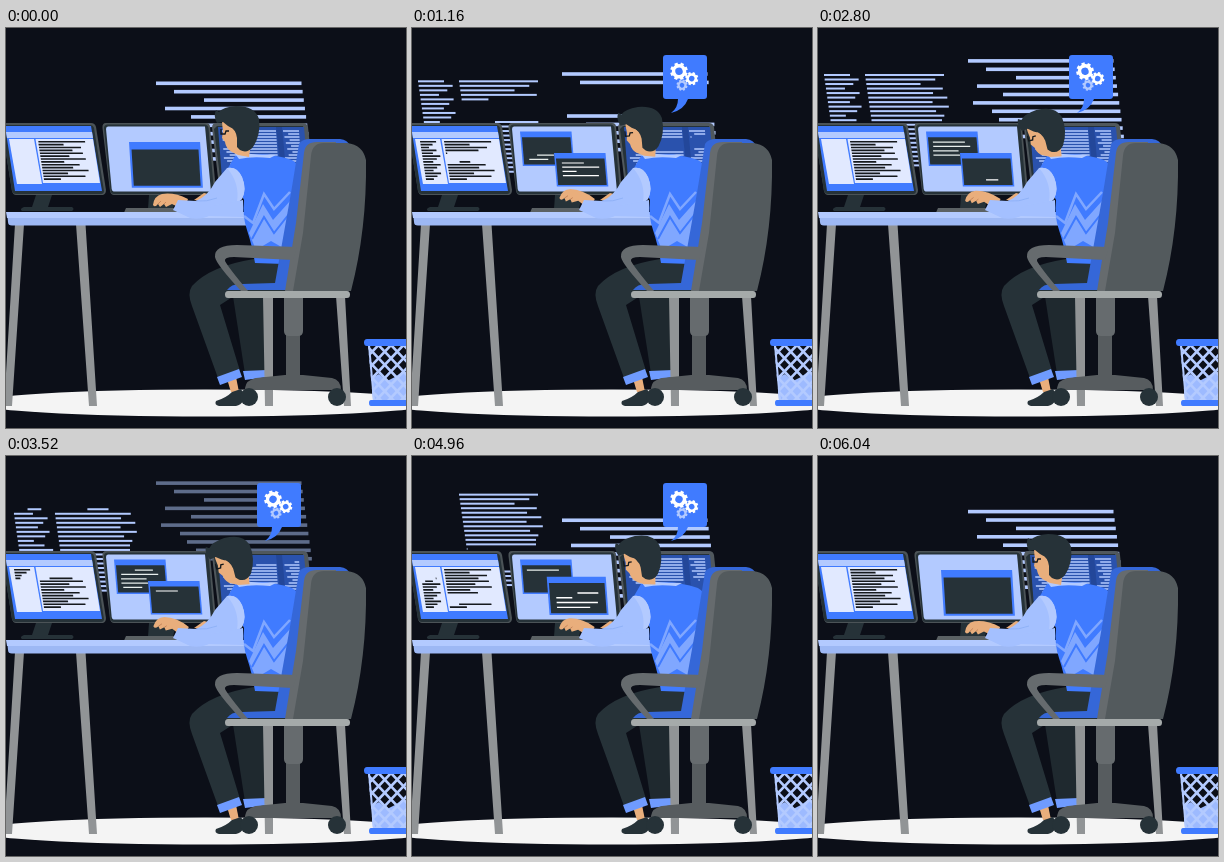
An HTML page with a canvas that plays this animation: 400 px wide and 400 px high, repeating every 6.08 s.

```html
<!DOCTYPE html>
<html lang="en">
<head>
<meta charset="utf-8">
<title>Programmer at work</title>
<style>
html, body { margin: 0; width: 100%; height: 100%; overflow: hidden; background: #0c0f18; }
canvas { display: block; width: 400px; height: 400px; }
</style>
</head>
<body>
<canvas id="stage" width="400" height="400"></canvas>
<script>
const ctx = document.getElementById('stage').getContext('2d');
const LOOP = 6080, WAVE = LOOP / 2;
const BLUE = '#407bff', PALE = '#b3caff', SLEEVE = '#a4c0ff', DARK = '#263238', SKIN = '#e9ae7c';
const STEEL = '#919496', GREY = '#666b6e', CHAIR = '#535a5d';

const clamp = v => Math.max(0, Math.min(1, v));
const paths = {};
function shape(color, d) {
  ctx.fillStyle = color;
  ctx.fill(paths[d] ||= new Path2D(d));
}
function stroke(color, width, d) {
  ctx.strokeStyle = color;
  ctx.lineWidth = width;
  ctx.stroke(paths[d] ||= new Path2D(d));
}
function disc(color, x, y, rx, ry = rx) {
  ctx.fillStyle = color;
  ctx.beginPath();
  ctx.ellipse(x, y, rx, ry, 0, 0, 7);
  ctx.fill();
}
function layer(alpha, draw) {
  if (alpha <= 0) return;
  ctx.save();
  ctx.globalAlpha *= alpha;
  draw();
  ctx.restore();
}
// Smoothed interpolation through [time, value] pairs.
function key(t, ...keys) {
  let [t0, v0] = keys[0];
  for (const [t1, v1] of keys) {
    if (t < t1) {
      const k = clamp((t - t0) / (t1 - t0));
      return v0 + (v1 - v0) * k * k * (3 - 2 * k);
    }
    [t0, v0] = [t1, v1];
  }
  return v0;
}
// A line of code, typed at `on` and wiped from its left end at `off`.
function row(color, x0, x1, y, h, p, off, on, d = 140) {
  let a = clamp((p - off) / d), b = clamp((p - on) / d);
  if (off < on) p < on ? b = 1 : a = 0;
  if (b <= a) return;
  ctx.fillStyle = color;
  ctx.fillRect(x0 + (x1 - x0) * a, y - h / 2, (x1 - x0) * (b - a), h);
}

const rightStarts = [150, 168, 198, 159, 185, 155, 174, 181, 190, 184];
const rightOn = { 2: 1250, 3: 1400, 4: 1550, 5: 1080, 6: 2300 };
const midEnds = [126, 117, 102, 124, 114, 128, 113, 129, 116, 124];
const sideEnds = [32, 40, 34, 25, 39, 34, 28, 39, 34, 22];

function backgroundCode(t, p) {
  const shift = t < 3640 ? t : t - LOOP;
  layer(t < 3640 ? 1 - clamp((t - 3400) / 240) : clamp((t - 3640) / 1000), () => {
    rightStarts.forEach((x, i) => {
      const on = rightOn[i] ?? -LOOP;
      const off = on < 0 ? LOOP * 2 : i == 6 ? 1830 : 420 + 40 * i;
      row(PALE, x, 295.5 + 1.15 * i, 55.3 - .008 * shift + 8.4 * i, 3.6, t, off, on, 200);
    });
  });
  layer(Math.min(clamp((t - 250) / 450), clamp((5900 - t) / 600)), () => {
    for (let i = 0; i < 21; i++) {
      const y = 57.8 - .00386 * t + 4.52 * i, lean = .65 * i;
      row(PALE, 47 + lean, i < 10 ? midEnds[i] + .4 * lean : 124, y, 2, p, 220 + 100 * i, 720 + 100 * i, 100);
      if (i < 13) row(PALE, 6 + lean, sideEnds[i % 10] + lean, y, 2, t, 3260 + 100 * i, 250 + 55 * i, 120);
    }
  });
}

function gear(color, x, y, r, teeth, angle) {
  ctx.save();
  ctx.translate(x, y);
  ctx.rotate(angle);
  ctx.strokeStyle = color;
  ctx.lineWidth = r * .4;
  ctx.beginPath();
  ctx.arc(0, 0, r * .62, 0, 7);
  ctx.stroke();
  ctx.fillStyle = color;
  for (let i = 0; i < teeth; i++) {
    ctx.rotate(2 * Math.PI / teeth);
    ctx.fillRect(-r * .19, -r, r * .38, r * .35);
  }
  ctx.restore();
}
function bubble(t) {
  const s = key(t, [440, 0], [760, 1], [5720, 1], [5960, 0]);
  if (!s) return;
  const turn = t / LOOP * 2 * Math.PI;
  ctx.save();
  ctx.translate(273, 53);
  ctx.scale(s, s);
  ctx.translate(-273, -53);
  shape(BLUE, 'M254 27H292Q295 27 295 30V68Q295 71 292 71H276Q272 82 259 85Q266 80 266 71H254Q251 71 251 68V30Q251 27 254 27Z');
  gear('#fff', 267, 43.3, 8.8, 8, turn);
  gear('#fff', 279.7, 50.6, 6.6, 8, -turn);
  gear(PALE, 270, 57.2, 5.6, 8, -turn);
  ctx.restore();
}

function leftMonitor(p) {
  shape('#4b5357', 'M-4 95H85Q89 95 90 99L100 162Q100 166 97 167H10Q7 167 6 163L-4 100Z');
  shape(DARK, 'M-4 97H84Q87 97 88 100L98 163Q98 166 95 166H10Q7 166 6 163L-4 100Z');
  shape(BLUE, 'M-1 98H85L96 163H9Z');
  shape(PALE, 'M0 104H86L87 110H1Z');
  shape('#e1e9ff', 'M3 111H28L36 156H11Z');
  shape('#e1e9ff', 'M29.500 111H87L94 155H37Z');
  ctx.save();
  ctx.transform(1, 0, .155, 1, -.155 * 113, 0);
  const ends = [79, 57, 74, 65, 75, 61, 77, 55, 70, 63, 78, 57, 74, 49];
  ends.forEach((x, i) => {
    const y = 113.7 + 2.88 * i, off = Math.max(0, 1060 + (y - 133.5) * 56);
    row('#15191d', 32, x, y, 1.6, p, off, off + 560, 150);
  });
  for (let i = 0; i < 14; i++) {
    row('#15191d', 8, 16 + (i * 7 + 8) % 11, 113.7 + 2.88 * i, 1.6, p, 1600 + 72 * i, 280 + 55 * i, 110);
  }
  ctx.restore();
  shape(DARK, 'M30 167H46L42 179H66Q69 181 66 183H16Q13 181 18 179H26Z');
}

// Content uses a 54 by 33 grid.
function editor(x, y, w, h, content) {
  ctx.save();
  ctx.translate(x, y);
  ctx.transform(w / 54, 0, .085, h / 33, 0, 0);
  shape(BLUE, 'M0 0H51.500V33.500H0Z');
  shape(DARK, 'M1.500 5.500H50V32H1.500Z');
  content();
  ctx.restore();
}
function middleMonitor(t, p) {
  shape('#4b5357', 'M100 95H200Q204 95 204 99L210 163Q210 167 207 167H108Q105 167 104 163L96.500 100Q96 95 100 95Z');
  shape(DARK, 'M101 96.500H199Q202 97 202.500 100L208 163Q208 166 205 166H108Q105 166 104.500 163L98 100Q98 97 101 96.500Z');
  shape(PALE, 'M102 98.500H199L205 163.500H107.500Q106 163 105.700 161L100 101Q100 98.500 102 98.500Z');
  const back = key(t, [480, 0], [850, 1], [5640, 1], [5940, 0]);
  layer(back, () => editor(108, 103.5, 54, 34, () => {
    [[6, 38], [6, 43], [5.5, 31], [5.5, 32], [7, 26]].forEach(([a, b], i) =>
      row('#e8efed', a, b, 10.3 + 4.2 * i, 1.2, p, 420 + 230 * i, 1720 + 280 * i));
  }));
  const big = key(t, [0, 1], [350, 1], [850, 0], [4750, 0], [5250, 1]);
  editor(142 - 19 * big, 125 - 11 * big, 54 + 20.5 * big, 33 + 12 * big, () => {
    [[7, 29], [7, 44], [7, 21], [7, 43], [7, 36]].forEach(([a, b], i) =>
      row('#fff', a, b, 10 + 4.2 * i, 1.2, p, 1560 + 290 * i, 280 + 240 * i));
  });
  shape(DARK, 'M143 167H170L167 181H142Z');
}

function rightMonitor(p) {
  shape('#50585d', 'M210 95H297Q301 95 302 99L309 166H214L206 100Q206 95 210 95Z');
  shape(DARK, 'M211 98H297L304 165H216L208 101Z');
  shape('#2a52ad', 'M212 99H298L304 164H217Z');
  shape('#23479a', 'M270 99H276L282 164H277Z');
  ctx.save();
  ctx.transform(1, 0, .07, 1, -.07 * 103, 0);
  for (let i = 0; i < 12; i++) {
    const y = 103 + 3 * i, off = 100 + 150 * i;
    row(PALE, 216 + i % 3 * 3, 270, y, 1.6, p, off, off + 600);
    row(PALE, 277 + i * 5 % 9, 293, y, 1.6, p, off + 150, off + 750);
  }
  ctx.restore();
}

function desk() {
  shape(STEEL, 'M9 196H18L6 378H-2ZM70 196H79.500L91 378H83Z');
  shape('#5b6164', 'M120 180H172V184.500H118Z');
  shape('#9db8f4', 'M1 184H248V197.500H6Q2 197.500 2 194Z');
  shape(PALE, 'M0 184H249V190H1Z');
}

function head(t) {
  const tilt = key(t, [0, 0], [400, 0], [1160, -5], [1920, -10], [2800, -14.5], [4360, -15], [5560, -2.5], [6040, 0]);
  ctx.save();
  ctx.translate(240, 126);
  ctx.rotate(tilt * Math.PI / 180);
  ctx.translate(-240, -126);
  shape(SKIN, 'M216 90Q216 98 217 103L216 110L219 114Q220 121 226 124L232 127L243 129L246 108L230 92Z');
  shape(DARK, 'M211 95Q207 88 210 82L213 84Q217 79 230 78Q249 78 253 91Q255 107 247 119Q241 126 234 122L231 119V110Q230 101 222 98L217 94Z');
  disc(SKIN, 225, 106, 3.4, 6);
  stroke('#15191d', 1.3, 'M215 101V106H219L220 103H223');
  ctx.restore();
}

function person(t) {
  shape(SKIN, 'M221 351L230 349L233 364H225Z');
  shape(DARK, 'M210 373Q220 370 226 364L235 361Q239 367 237 373Q235 377 230 378H213Q208 377 210 373Z');
  shape('#1f292f', 'M226 262H258L261 344L239 346Z');
  shape(DARK, 'M248 231Q204 238 186 258Q181 265 186 278L212 350L234 343L214 277L228 268L258 264H280V231Z');
  shape('#6f9bff', 'M211 349L233 341L236 349L214 357ZM237 343L261 342L262 349L239 352Z');
  shape(SKIN, 'M188 172L198 165L206 167L200 174Z');
  shape(BLUE, 'M229 128Q255 124 270 128Q287 130 293 138L278 236L249 235Q246 217 241 202Q236 187 238 172L222 140Z');
  stroke('#80a7ff', 2.5, 'M238 188L247 195L258 166L268 181L284 164');
  shape('#80a7ff', 'M243 205L257 176L267 192L284 173L279 221L265 213L250 222Z');
  stroke(BLUE, 2, 'M246 211L258 189L268 205L283 186');
  shape(PALE, 'M227 123Q242 127 270 127L264 130Q246 128 233 131Z');

  const lift = (1 - Math.cos(t / LOOP * 36 * Math.PI)) / 2;
  ctx.save();
  ctx.translate(178, 176 - lift);
  ctx.rotate(lift * .2);
  ctx.translate(-178, -177);
  shape(SKIN, 'M182 172Q168 165 156 167Q148 169 147 178Q149 181 152 177L154 180L158 177L160 180L166 177L178 183Z');
  stroke('#b97850', .7, 'M152 177L155 174M158 177L160 175');
  ctx.restore();
  shape(SLEEVE, 'M221 140Q231 138 236 149Q241 161 236 171Q228 180 212 183Q198 193 184 190L167 182L172 172L190 173Q202 168 209 154Z');
  shape(PALE, 'M221 140Q231 138 236 149Q241 161 236 171L231 174Q234 155 221 140Z');
  shape(SLEEVE, 'M205 178L237 172V189L203 188Z');
  stroke('#8baef5', .8, 'M190 173Q201 174 211 170');
  head(t);
}

function chair() {
  shape('#3567d8', 'M293 116Q296 111 304 111H334Q342 112 344 118L302 125L284 262H221Q226 255 236 256L269 255L285 165Z');
  shape(GREY, 'M298 125Q299 114 311 114H330L300 263H279L290 195Z');
  shape(CHAIR, 'M305 128Q306 115 318 115H341Q357 117 360 132Q361 201 345 263H287L297 205Z');
  shape(GREY, 'M291 219L231 217Q208 217 209 229Q210 236 235 263H242Q222 239 219 233Q218 229 228 229L287 232Z');
  shape(STEEL, 'M257 268H267V378H259ZM330 268H339L345 378H338Z');
  shape('#a5aaaa', 'M222 263H341Q344 263 344 266.500Q344 270 341 270H222Q219 270 219 266.500Q219 263 222 263Z');
  shape('#575c5f', 'M280 304H294V352H280Z');
  shape(GREY, 'M278 270H297V303Q297 308 292 308H283Q278 308 278 303Z');
  shape('#575c5f', 'M239 360Q240 352 250 350L279 347H297L326 350Q335 352 335 362H239Z');
  disc(DARK, 243, 369, 9);
  disc(DARK, 331, 369, 9);
}

function bin() {
  ctx.save();
  ctx.clip(paths.bin ||= new Path2D('M362 317H410L404 373H367Z'));
  shape('#9dbaff', 'M366 350L373 346L381 353L389 349L396 344L410 352V373H366Z');
  for (let i = -6; i < 7; i++) {
    const x = 385 + i * 12.5;
    stroke(PALE, 2.6, `M${x} 317L${x + 53} 373M${x} 317L${x - 53} 373`);
  }
  stroke(PALE, 4, 'M362 317L367 373');
  ctx.restore();
  shape(BLUE, 'M361 311H400V318H361Q358 318 358 314.500Q358 311 361 311ZM365 372H400V378H365Q363 378 363 375Q363 372 365 372Z');
}

function frame(now) {
  const t = now % LOOP, p = t % WAVE;
  ctx.fillStyle = '#0c0f18';
  ctx.fillRect(0, 0, 400, 400);
  disc('#f4f4f4', 200, 375, 230, 13.6);
  backgroundCode(t, p);
  bubble(t);
  rightMonitor(p);
  middleMonitor(t, p);
  leftMonitor(p);
  desk();
  person(t);
  chair();
  bin();
}
const start = performance.now();
function tick() {
  frame(performance.now() - start);
  requestAnimationFrame(tick);
}
tick();
</script>
</body>
</html>
```
